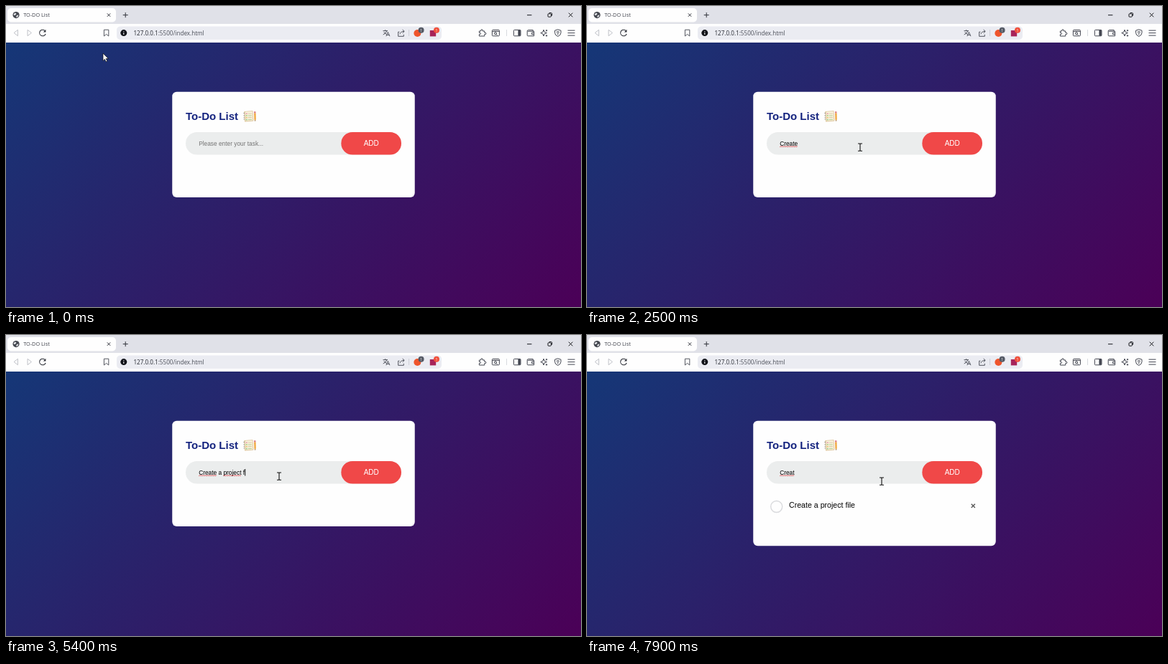
These frames come from a looping animation (800x420 px, 8 s). An HTML page with a canvas:

```html
<!DOCTYPE html>
<html lang="en">
<head>
<meta charset="utf-8">
<title>TO-DO List</title>
<style>
html, body { margin: 0; width: 100%; height: 100%; overflow: hidden; }
canvas { display: block; width: 800px; height: 420px; }
</style>
</head>
<body>
<canvas id="stage"></canvas>
<script>
const LOOP = 8000;
const TASK = 'Create a project file';
const ARIAL = '"Liberation Sans", Arial, sans-serif';
const UI = '"Open Sans", "Noto Sans", sans-serif';
const INK = '#41444f';
const ADDED = 6000;

// [start, end, characters before, characters after]
const typing = [
  [1500, 1980, 0, 6], [3400, 3950, 6, 10], [4250, 5350, 10, 18],
  [5450, 5650, 18, 21], [6950, 7380, 0, 5]
];
// [start, end, x, y]
const moves = [
  [0, 100, 135, 66], [150, 900, 380, 197],
  [5650, 5920, 515, 192], [6250, 6700, 410, 204]
];
// [focus, blur]
const focus = [[1000, ADDED], [6750, LOOP]];

const canvas = document.getElementById('stage');
const c = canvas.getContext('2d');
const dpr = window.devicePixelRatio || 1;
canvas.width = 800 * dpr;
canvas.height = 420 * dpr;

function box(x, y, w, h, r, fill) {
  c.fillStyle = fill;
  c.beginPath();
  c.roundRect(x, y, w, h, r);
  c.fill();
}
function frame(x, y, w, h, r) {
  c.beginPath();
  c.roundRect(x, y, w, h, r);
  c.stroke();
}
function disc(x, y, r, fill) {
  c.fillStyle = fill;
  c.beginPath();
  c.arc(x, y, r, 0, Math.PI * 2);
  c.fill();
}
function ring(x, y, r, from = 0, to = Math.PI * 2) {
  c.beginPath();
  c.arc(x, y, r, from, to);
  c.stroke();
}
function pen(color, width) {
  c.strokeStyle = color;
  c.lineWidth = width;
}
function path(d, fill) {
  const p = new Path2D(d);
  if (fill) {
    c.fillStyle = fill;
    c.fill(p);
  } else c.stroke(p);
}
function text(s, x, y, font, color, align = 'left') {
  c.font = font;
  c.fillStyle = color;
  c.textAlign = align;
  c.fillText(s, x, y);
}
function cross(x, y, r) {
  path(`M${x - r} ${y - r}L${x + r} ${y + r}M${x + r} ${y - r}L${x - r} ${y + r}`);
}

function drawTabs() {
  box(0, 0, 800, 25, 0, '#e0e1e8');
  box(2, 3, 151, 19.5, 5, '#fefefe');
  disc(14, 12.6, 4.6, '#454850');
  path('M10.5 11.2L13 9.6L14.5 11L13 12.6L11.5 13.2ZM14.5 13.4L17.3 12.2L16.6 15L14.2 16Z', '#e6e7ea');
  text('TO-DO List', 24.2, 15.3, '7.3px ' + UI, '#3c3f48');
  pen('#30333b', 1);
  cross(143, 12.6, 2.2);
  path('M162.7 12.6H169.7M166.2 9.1V16.1');
  pen('#16181c', 1);
  path('M725 12.7H731.4');
  frame(754, 10.8, 4.4, 4.4, 0.8);
  path('M755.7 9.6H758.5Q759.6 9.6 759.6 10.7V13.6');
  cross(785.6, 12.5, 2.8);
}

function drawToolbar() {
  box(0, 25, 800, 26, 0, '#fefefe');
  box(154, 28.5, 452, 18.5, 5, '#ebecf2');
  pen('#b9bbc2', 0.9);
  path('M16.4 33.3V41.7L11 37.5Z');
  path('M30 33.3V41.7L35.4 37.5Z');
  pen('#2c2f37', 1.1);
  ring(51, 37.5, 4.3, 0.35, 5.5);
  path('M55.4 32.8V36.4H51.8Z', '#2c2f37');

  pen(INK, 0.9);
  path('M136.4 33.2H142.8V42L139.6 39.4L136.4 42Z');
  disc(163.8, 37.6, 4.5, '#111319');
  box(163.3, 36.9, 1, 3, 0, '#fff');
  box(163.3, 35, 1, 1.1, 0, '#fff');
  const url = '8.12px ' + UI;
  text('127.0.0.1', 177.4, 40.8, url, '#23262e');
  const w = c.measureText('127.0.0.1').width;
  text(':5500/index.html', 177.4 + w, 40.8, url, '#4a4d57');

  path('M524.5 34.6H531M527.7 33.2V34.6M530 34.6Q528.5 38.5 524.7 40M525.8 36.3Q527 38.4 529.4 39.4M528.9 42.2L531.4 36.4L533.9 42.2M529.7 40.4H533.1');
  path('M547.4 36.2H545.7V42.3H553.3V39.8M548 39.2Q548.6 35.6 554 35.4M551.7 33L554.2 35.4L551.7 37.8');
  pen('#c5c7ce', 0.8);
  path('M560.6 33V42');

  disc(572.4, 38, 5, '#ef552c');
  box(589.8, 34, 8.4, 8.4, 0, '#a72359');
  disc(577.6, 33.8, 4, '#565b66');
  disc(599, 33.8, 4, '#f0503c');
  const tiny = '5px ' + UI;
  text('1', 577.6, 35.6, tiny, '#fff', 'center');
  text('1', 599, 35.6, tiny, '#fff', 'center');

  pen(INK, 1);
  path('M658.4 35H660.8Q660.2 32.8 662 32.8Q663.8 32.8 663.2 35H665.8V37.3Q668 36.8 668 38.4Q668 40 665.8 39.5V42H658.4V39.6Q660.6 39.6 660.6 38.4Q660.6 37.2 658.4 37.3Z');
  frame(676.4, 33.4, 10, 8.4, 1);
  path('M676.4 35.4H686.4');
  ring(681, 38.2, 1.5);
  path('M682.1 39.3L683.5 40.7');
  pen('#cfd1d7', 0.8);
  path('M696.5 33V42');
  pen(INK, 1);
  frame(706.4, 33.4, 9.6, 8.4, 1);
  box(712.4, 33.6, 3.4, 8, 0, INK);
  path('M733.2 35.2V33.6H726.4Q725.2 33.6 725.2 35.2V40.8Q725.2 41.8 726.2 41.8H734.6V35.3H726M734.6 37.2H731.6V39.7H734.6');
  path('M748 33.2L749.2 36.4L752.4 37.6L749.2 38.8L748 42L746.8 38.8L743.8 37.6L746.8 36.4ZM752 33V35.4M750.8 34.2H753.2M752 40.2V42.6M750.8 41.4H753.2');
  path('M767.8 32.8L772 34.2V37.5Q772 40.8 767.8 42.4Q763.6 40.8 763.6 37.5V34.2Z');
  path('M765.7 36.3Q767.8 34.8 769.9 36.3M766.5 38Q767.8 37 769.1 38');
  disc(767.8, 39.4, 0.7, INK);
  path('M781.5 34.1H791.5M781.5 37.6H791.5M781.5 41.1H791.5');
}

function drawNotepad() {
  path('M331.4 147L343.4 146.2L344.4 160.6L332.2 161.4Z', '#d8bd8e');
  path('M332.6 147.6L342.7 147L343.5 159.8L333.2 160.4Z', '#f8f1dc');
  const marks = ['#e58da5', '#93c66e', '#e9b35a', '#8fca86'];
  marks.forEach((color, i) => {
    const y = 149.4 + i * 2.8;
    box(333.8, y, 1.8, 1.6, 0.3, color);
    box(336.6, y + 0.3, 5.4, 0.9, 0.3, i % 2 ? '#b3cf93' : '#d3c39f');
    box(330.2, y - 0.3, 2, 0.8, 0.4, '#8d8783');
  });
  path('M345.1 149.4L347.5 149.3L347.7 158L346.6 161L345.4 158.1Z', '#f0a63b');
  path('M345 147.3L347.4 147.2L347.5 149.3L345.1 149.4Z', '#dd7a80');
  path('M346.1 159.4L347.1 159.4L346.6 161Z', '#3d332e');
}

function drawPage(t) {
  // 135 degree gradient across the 800 x 369 viewport
  const d = (800 + 369) / 4;
  const g = c.createLinearGradient(400 - d, 235.5 - d, 400 + d, 235.5 + d);
  g.addColorStop(0, '#153777');
  g.addColorStop(1, '#4b0057');
  c.fillStyle = g;
  c.fillRect(0, 51, 800, 369);

  const added = t >= ADDED;
  box(231.25, 119.8, 337.5, added ? 174.4 : 147.2, 6.2, '#fefefe');
  text('To-Do List', 250, 159.2, 'bold 15px ' + ARIAL, '#14237f');
  drawNotepad();
  box(250, 176, 300, 31.5, 15.75, '#ebeded');
  box(466.3, 176, 83.7, 31.5, 15.75, '#f04848');
  text('ADD', 508.2, 195.2, '10px ' + ARIAL, '#fff', 'center');
  if (added) {
    pen('#d9dadd', 1.4);
    ring(263.7, 239.5, 8);
    text(TASK, 281, 240.6, '10.625px ' + ARIAL, '#000');
    pen('#555', 1.3);
    cross(537.3, 238.4, 2.6);
  }
}

function inputState(t) {
  const span = focus.find(([a, b]) => t >= a && t < b);
  let count = 0, last = span ? span[0] : 0;
  for (const [a, b, from, to] of typing) {
    if (t < a || (t >= ADDED && a < ADDED)) continue;
    const k = Math.min(1, (t - a) / (b - a));
    count = from + Math.floor(k * (to - from) + 1e-6);
    last = Math.min(t, b);
  }
  return { value: TASK.slice(0, count), idle: t - last, focused: !!span };
}

function squiggle(x, w) {
  pen('#e0252b', 0.8);
  c.beginPath();
  for (let i = 0; i <= w; i += 0.5) c.lineTo(x + i, 196.1 + 0.5 * Math.sin(i * 2.5));
  c.stroke();
}

function drawInput(t) {
  const { value, idle, focused } = inputState(t);
  const x = 268.2;
  text(value || 'Please enter your task...', x, 194.6, '8.333px ' + ARIAL, value ? '#000' : '#757575');
  for (const m of value.matchAll(/\w{3,}/g)) {
    const end = m.index + m[0].length;
    if (end === value.length && idle < 300) continue;
    squiggle(x + c.measureText(value.slice(0, m.index)).width, c.measureText(m[0]).width);
  }
  if (focused && idle % 1000 < 500) {
    const w = value ? c.measureText(value).width : 0;
    box(x + w + 0.2, 187, 0.9, 9.5, 0, '#000');
  }
}

function pointerAt(t) {
  let [, , x, y] = moves[0];
  for (const [a, b, tx, ty] of moves) {
    if (t < a) break;
    const k = Math.min(1, (t - a) / (b - a));
    const e = k * k * (3 - 2 * k);
    x += (tx - x) * e;
    y += (ty - y) * e;
  }
  return [x, y];
}

function drawPointer(t) {
  const [x, y] = pointerAt(t);
  const inRow = y > 176 && y < 207.5;
  c.save();
  c.translate(x, y);
  c.lineJoin = 'round';
  if (inRow && x > 250 && x < 466) {
    pen('#111', 1.1);
    path('M-3 -5H-0.8L0 -4.5L0.8 -5H3M0 -4.5V4.8M-3 5.3H-0.8L0 4.8L0.8 5.3H3');
  } else {
    const hand = 'M-1 0.6Q0 -0.6 1 0.6V4.2L4.3 5Q5.2 5.4 5.1 6.5L4.3 10.2V11.7H-0.9V10.4L-3.8 7.2Q-3.9 5.7 -2.5 6L-1 7.3Z';
    const arrow = 'M0 0V10.4L2.4 8.2L4 11.7L5.8 10.9L4.2 7.5H7.4Z';
    const shape = inRow && x >= 466 && x < 550 ? hand : arrow;
    path(shape, '#fff');
    pen('#111', 0.7);
    path(shape);
  }
  c.restore();
}

function draw(now) {
  const t = now % LOOP;
  c.setTransform(dpr, 0, 0, dpr, 0, 0);
  drawPage(t);
  drawTabs();
  drawToolbar();
  drawInput(t);
  drawPointer(t);
}

let begin;
function tick(now) {
  begin ??= now;
  draw(now - begin);
  requestAnimationFrame(tick);
}
draw(0);
requestAnimationFrame(tick);
</script>
</body>
</html>
```
